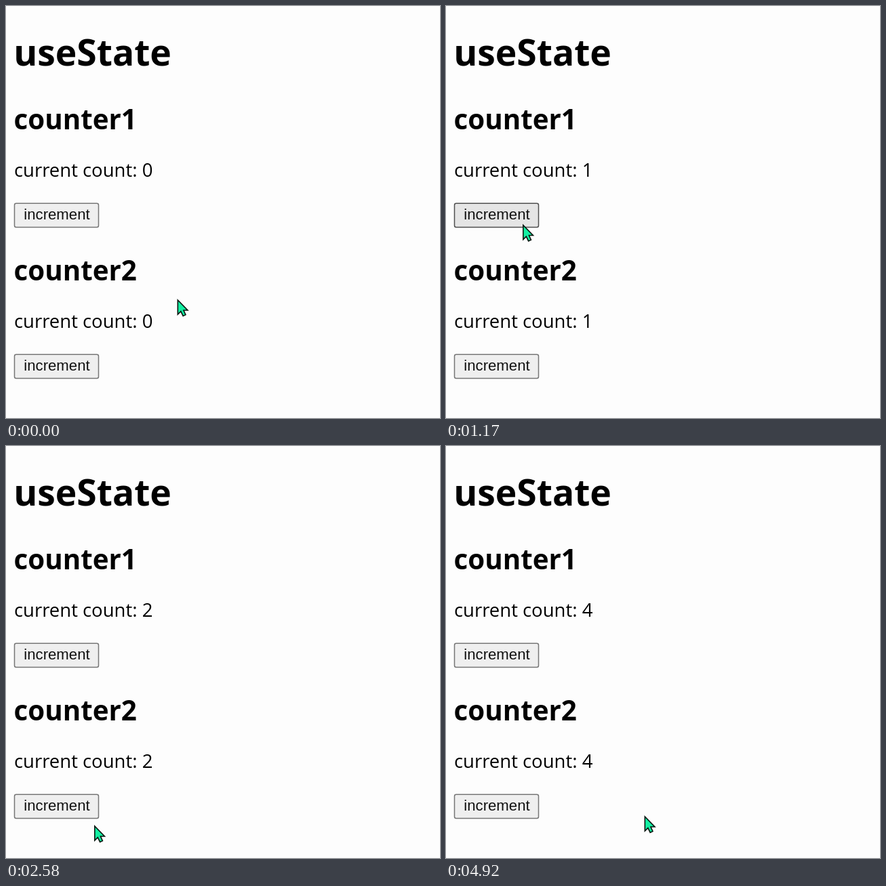
Recreate the animation shown at these times as an HTML page. Size 640x608 px, loop 5080 ms.

```html
<!DOCTYPE html>
<html lang="en">
<head>
<meta charset="utf-8">
<title>useState counters</title>
<style>
  html, body { margin: 0; width: 100%; height: 100%; overflow: hidden; background: #fdfdfd; }
  svg { display: block; width: 640px; height: 608px; }
  text { font-family: "Open Sans", "Noto Sans", sans-serif; fill: #000; white-space: pre; }
  .h1 { font-size: 53.4px; font-weight: 700; }
  .h2 { font-size: 40.3px; font-weight: 700; }
  .count { font-size: 27.5px; }
  .label { font: 22.2px "Liberation Sans", Arial, sans-serif; text-anchor: middle; fill: #111; }
  .button rect { fill: #efefef; stroke: #767676; stroke-width: 1.5; }
  .button.hover rect { fill: #e5e5e5; stroke: #4f4f4f; }
  .button.active rect { fill: #f5f5f5; stroke: #8d8d8d; }
</style>
</head>
<body>
<svg viewBox="0 0 640 608">
  <defs>
    <g id="counter">
      <text class="h2" x="11.6" y="182">counter</text>
      <text class="count" x="12" y="252">current count: 0</text>
      <g class="button">
        <rect x="12.5" y="291.2" width="124" height="35.2" rx="2.5"/>
        <text class="label" x="75" y="315">increment</text>
      </g>
    </g>
  </defs>
  <text class="h1" x="11.2" y="88">useState</text>
  <g id="counters"></g>
  <g id="cursor">
    <path id="arrow" d="M0.8 1V22L5.3 17.6L8.6 24.4L12.4 22.7L9.4 16H15.4Z"
      fill="#12efa2" stroke="#08140e" stroke-width="1.6"/>
    <g id="beam" fill="none">
      <path d="M-8 -11H8M0 -11V11M-8 11H8" stroke="#064a2c" stroke-width="4"/>
      <path d="M-7 -11H7M0 -11V11M-7 11H7" stroke="#35a468" stroke-width="1.2"/>
    </g>
  </g>
</svg>
<script>
// The screen updates at 12 fps; moves and clicks are timed in these ticks.
const LOOP = 5080, TICK = 1000 / 12, BLOCK = 223;

const home = { x: 252.5, y: 433 };
const moves = [
  { from: 0, to: 2, x: 241, y: 425 },
  { from: 3, to: 8, x: 113, y: 326 },
  { from: 9, to: 10, x: 113, y: 322.5 },
  { from: 23, to: 25, x: 136, y: 390 },
  { from: 25, to: 30, x: 130, y: 560 },
  { from: 31, to: 35, x: 128, y: 531 },
  { from: 47, to: 49, x: 172, y: 536 },
  { from: 49, to: 52, x: 292.5, y: 546 }
];
const clicks = [13, 23, 37, 46];

const $ = id => document.getElementById(id);
const easeOut = p => 1 - (1 - p) ** 2;
const clamp = p => Math.min(1, Math.max(0, p));
const inBox = (x, y, [left, top, right, bottom]) =>
  x >= left && x < right && y >= top && y < bottom;

const counters = [0, 1].map(i => {
  const group = $("counter").cloneNode(true);
  group.removeAttribute("id");
  group.setAttribute("transform", `translate(0 ${i * BLOCK})`);
  group.querySelector(".h2").textContent += i + 1;
  $("counters").append(group);
  return {
    offset: i * BLOCK,
    count: group.querySelector(".count"),
    button: group.querySelector(".button")
  };
});

function pointerAt(tick) {
  return moves.reduce((p, { from, to, x, y }) => {
    const k = easeOut(clamp((tick - from) / (to - from)));
    return { x: p.x + (x - p.x) * k, y: p.y + (y - p.y) * k };
  }, home);
}

function render(t) {
  const tick = Math.floor((t + 4) / TICK);
  const { x, y } = pointerAt(tick);
  const total = clicks.filter(up => up <= tick).length;
  const pressed = clicks.some(up => tick >= up - 2 && tick < up);
  let overText = false;

  for (const { offset, count, button } of counters) {
    const localY = y - offset;
    const hover = inBox(x, localY, [12, 291, 137, 326]);
    count.textContent = "current count: " + total;
    button.classList.toggle("hover", hover);
    button.classList.toggle("active", hover && pressed);
    overText ||= inBox(x, localY, [12, 140, 193, 193]) || inBox(x, localY, [12, 229, 216, 260]);
  }

  $("cursor").setAttribute("transform", `translate(${x} ${y})`);
  $("arrow").style.display = overText ? "none" : "";
  $("beam").style.display = overText ? "" : "none";
}

const start = performance.now();
function loop() {
  render((performance.now() - start) % LOOP);
  requestAnimationFrame(loop);
}
loop();
</script>
</body>
</html>
```
